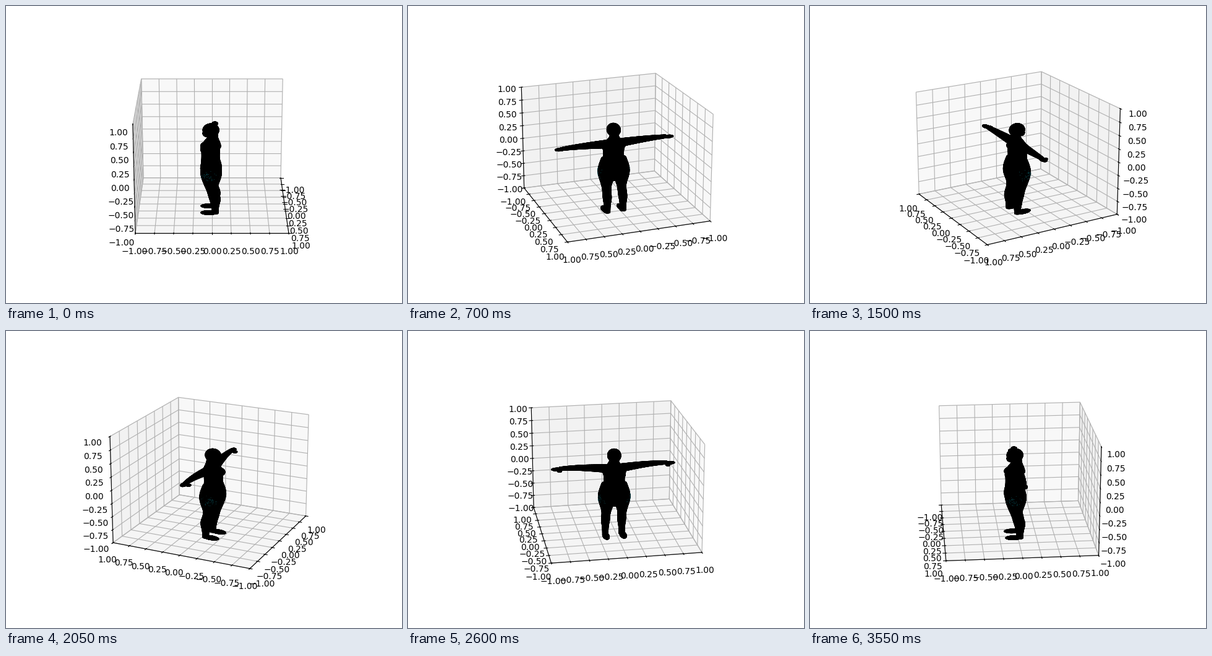
Animation of 640 by 480 pixels, one loop 3.6 s. Source, as a matplotlib script:

```python
import numpy as np
import matplotlib.pyplot as plt
from matplotlib.animation import FuncAnimation
from mpl_toolkits.mplot3d.art3d import Poly3DCollection

FRAMES, INTERVAL = 72, 50
ELEV, STEP = 20, 360 / FRAMES
SKIN, MESH = "#0b525a", "black"
TURN = np.linspace(0, 2 * np.pi, 20, endpoint=False)


def smooth(u):
    u = np.clip(u, 0, 1)
    return u * u * (3 - 2 * u)


def bump(z, centre, width):
    return np.exp(-(((z - centre) / width) ** 2))


def skin(x, y, z):
    """Quads over a grid of rings, closed at both ends."""
    rings = np.stack(np.broadcast_arrays(x, y, z), axis=-1)
    ahead = np.roll(rings, -1, axis=1)
    quads = np.stack([rings[:-1], ahead[:-1], ahead[1:], rings[1:]], axis=2)
    return [*quads.reshape(-1, 4, 3), rings[0], rings[-1]]


def column(top, bottom, shape, steps=24):
    """Upright tube; shape(z) gives x, rx, y, ry."""
    z = np.linspace(top, bottom, steps)[:, None]
    x, rx, y, ry = shape(z)
    return skin(x + rx * np.cos(TURN), y + ry * np.sin(TURN), z)


def ball(centre, radii):
    (x, y, z), (rx, ry, rz) = centre, radii
    tilt = np.linspace(0, np.pi, 14)[:, None]
    return skin(x + rx * np.sin(tilt) * np.cos(TURN),
                y + ry * np.sin(tilt) * np.sin(TURN),
                z + rz * np.cos(tilt))


def mirrored(faces):
    return faces + [face * (-1, 1, 1) for face in faces]


def shoulders(z):
    s = smooth((0.34 - z) / 0.22)
    return 0, 0.06 + 0.1 * s, 0.01 - 0.02 * s, 0.065 + 0.065 * s


def waist(z):
    return 0, 0.14 + 0.79 * (z + 0.02) ** 2, -0.02, 0.122 + 0.28 * (z + 0.05) ** 2


def leg(z):
    """Hip, thigh, calf and ankle."""
    x = 0.1 + 0.015 * smooth((-z - 0.1) / 0.9)
    rx = 0.04 + 0.077 * bump(z, -0.34, 0.26) + 0.015 * bump(z, -0.82, 0.13)
    y = -0.012 + 0.055 * smooth((-z - 0.55) / 0.35)
    ry = 0.043 + 0.1 * bump(z, -0.33, 0.29) + 0.028 * bump(z, -0.82, 0.14)
    return x, rx, y, ry


def arm():
    u = np.linspace(0, 1, 22)[:, None]
    r = 0.073 - 0.043 * u
    return skin(0.08 + 0.66 * u,
                0.04 * np.sin(np.pi / 2 * u) + r * np.cos(TURN),
                0.185 + 0.035 * np.sin(0.6 * np.pi * u) + r * np.sin(TURN))


def build_body():
    faces = column(0.36, 0.12, shoulders) + column(0.14, -0.3, waist)
    faces += ball((0, -0.015, 0.437), (0.092, 0.112, 0.118))    # skull
    faces += ball((0, -0.075, 0.375), (0.055, 0.052, 0.060))    # jaw
    faces += ball((0, -0.010, -0.420), (0.090, 0.100, 0.120))   # pelvis
    half = column(-0.1, -1.12, leg, 36) + arm()
    half += ball((0.07, -0.075, 0.10), (0.075, 0.082, 0.075))   # bust
    half += ball((0.78, 0.04, 0.21), (0.072, 0.042, 0.022))     # hand
    half += ball((0.745, -0.005, 0.195), (0.032, 0.038, 0.020))  # thumb
    half += ball((0.12, -0.04, -1.105), (0.046, 0.118, 0.035))  # foot
    return faces + mirrored(half)


def build_glints(count=55):
    """Specks of skin left open by the coarser mesh on the hips."""
    rng = np.random.default_rng(4)
    turn = rng.normal(-0.35, 0.4, count)
    z = rng.normal(-0.36, 0.045, count)
    x, rx, y, ry = leg(z)
    spots = np.column_stack([x + 1.03 * rx * np.cos(turn),
                             y + 1.03 * ry * np.sin(turn), z])
    speck = 0.002 * np.eye(3)
    return mirrored([speck + spot for spot in spots])


fig = plt.figure(figsize=(6.4, 4.8), dpi=100)
ax = fig.add_subplot(projection="3d")
ax.set(xlim=(-1, 1), ylim=(-1, 1), zlim=(-1, 1))

body, glints = build_body(), build_glints()
colors = [MESH] * len(body) + [SKIN] * len(glints)
ax.add_collection3d(
    Poly3DCollection(body + glints, facecolors=colors, edgecolors=colors, linewidths=0.5)
)


def update(i):
    ax.view_init(elev=ELEV, azim=i * STEP)
    return []


anim = FuncAnimation(fig, update, frames=FRAMES, interval=INTERVAL,
                     repeat=True, repeat_delay=0)
plt.show()
```
